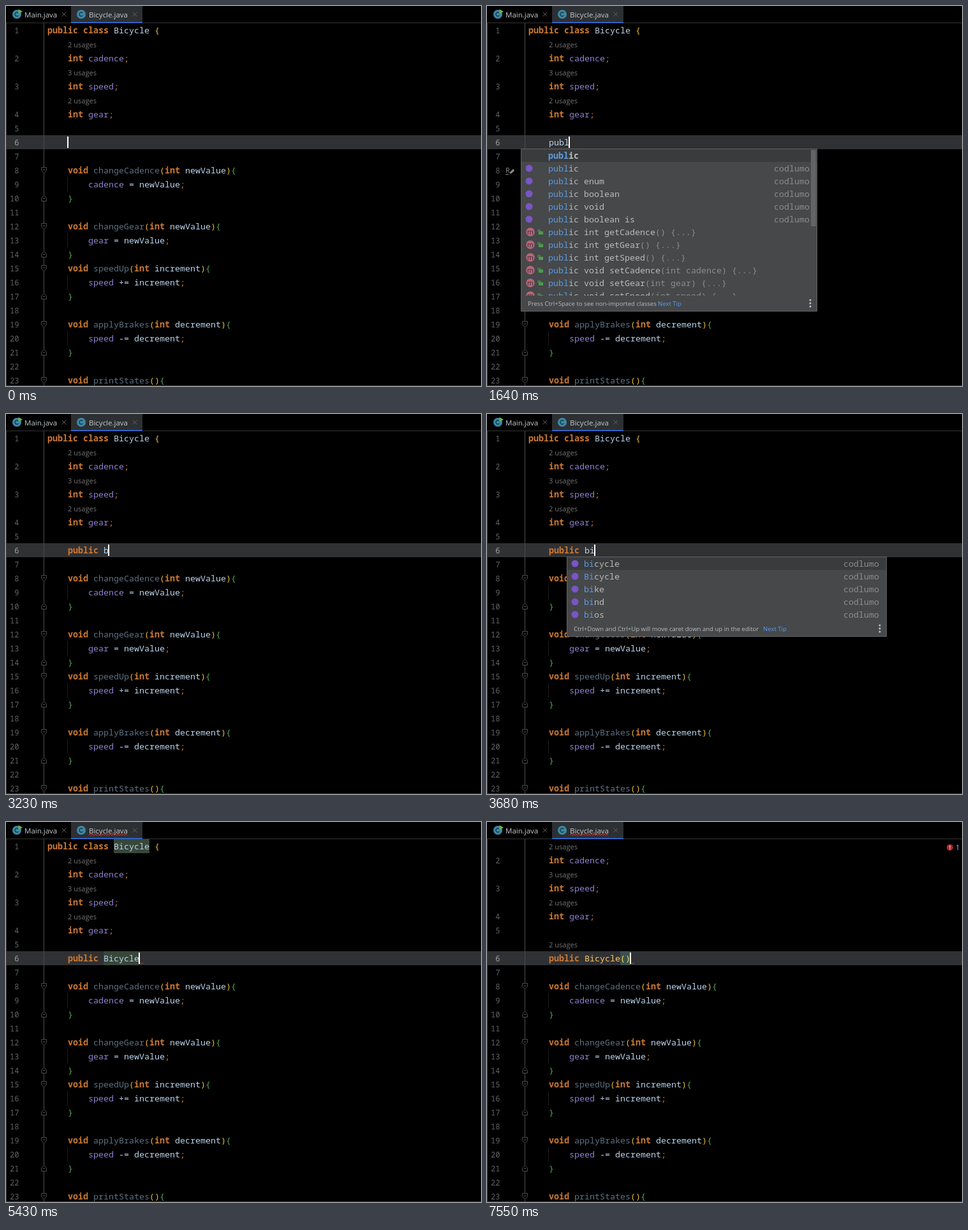
An HTML page that plays this animation: 745x597 px, repeating every 8 s.

```html
<!DOCTYPE html>
<html lang="en">
<head>
<meta charset="utf-8">
<title>Code completion</title>
<style>
  html, body { margin: 0; width: 100%; height: 100%; overflow: hidden; background: #000; }
  svg { display: block; width: 100%; height: 100%; }
  text { white-space: pre; }
  .mono { font: 13.333px "Noto Sans Mono", "DejaVu Sans Mono", monospace; }
  .num { font: 12px "Noto Sans Mono", "DejaVu Sans Mono", monospace; text-anchor: end; }
  .ui { font-family: "Open Sans", "Noto Sans", sans-serif; }
  .b { font-weight: 700; }
</style>
</head>
<body>
<svg id="stage" viewBox="0 0 745 597"></svg>
<script>
const LOOP = 8000, LINE = 22, ROW = 20, CH = 8, LEFT = 65;
const C = {
  text: '#bcd3ea', key: '#cc7832', field: '#9080d0', method: '#5f7180', made: '#ffc66d',
  gold: '#e8ba36', green: '#54a857', item: '#bbbbbb', dim: '#8c8c8c', match: '#5c9be0', red: '#cf3a36'
};
const stage = document.getElementById('stage');

const rect = (x, y, w, h, fill) => `<rect x="${x}" y="${y}" width="${w}" height="${h}" fill="${fill}"/>`;
const circle = (x, y, r, fill) => `<circle cx="${x}" cy="${y}" r="${r}" fill="${fill}"/>`;
const path = (d, stroke, fill = 'none', w = 1) =>
  `<path d="${d}" stroke="${stroke}" fill="${fill}" stroke-width="${w}"/>`;
const mono = (x, y, s, fill, bold) =>
  `<text class="mono${bold ? ' b' : ''}" x="${x}" y="${y}" fill="${fill}">${s}</text>`;
const ui = (x, y, s, fill, size) =>
  `<text class="ui" x="${x}" y="${y}" fill="${fill}" font-size="${size}">${s}</text>`;

// Last entry of [time, value] pairs that has begun at t
const at = (t, steps) => steps.reduce((v, s) => t >= s[0] ? s[1] : v, null);

function squiggle(x, end, y) {
  let d = `M${x} ${y + 2}`;
  for (let i = 1; x + i * 2 <= end; i++) d += `L${x + i * 2} ${y + (i % 2 ? 0 : 2)}`;
  return path(d, C.red);
}

// ---------- editor ----------

const SOURCE = [
  'public class Bicycle {', '    int cadence;', '    int speed;', '    int gear;', '', '', '',
  '    void changeCadence(int newValue){', '        cadence = newValue;', '    }', '',
  '    void changeGear(int newValue){', '        gear = newValue;', '    }',
  '    void speedUp(int increment){', '        speed += increment;', '    }', '',
  '    void applyBrakes(int decrement){', '        speed -= decrement;', '    }', '',
  '    void printStates(){'
];
const USAGES = { 2: 2, 3: 3, 4: 2 };

function tokenColor(tok, before) {
  if (/^(public|class|int|void)$/.test(tok)) return C.key;
  if (/^(cadence|speed|gear)$/.test(tok)) return C.field;
  if (/void $/.test(before)) return C.method;
  if (tok === ';') return C.key;
  if (/[()]/.test(tok) || /class/.test(before) && tok === '{') return C.gold;
  return /[{}]/.test(tok) ? C.green : C.text;
}

function codeLine(s, y) {
  let out = '';
  for (const m of s.matchAll(/\w+|[+\-]?=|\S/g)) {
    const fill = tokenColor(m[0], s.slice(0, m.index));
    out += mono(LEFT + m.index * CH, y, m[0], fill, fill === C.key && m[0] !== ';');
  }
  return out;
}

function fold(top, open) {
  const y = top + LINE / 2 + (open ? 0 : -1), k = open ? 1 : -1;
  return path(`M55.5 ${y + .5 - 5 * k}h8v${5 * k}l-4 ${4 * k}l-4 ${-4 * k}zM57.5 ${y + .5 - k}h4`, '#4a4a4a', '#000');
}

function lineTop(n, scrolled) {
  if (n >= 6) return 203 + (n - 6) * LINE;
  const inlays = Object.keys(USAGES).filter(k => k <= n).length;
  return 27 + (n - 1 + inlays) * LINE - (scrolled ? LINE : 0);
}

function editor(t) {
  const scrolled = t >= 7280, marked = t >= 5060 && t < 6970;
  let out = rect(1, 203, 744, 22, '#303133') + rect(59, 27, 1, 570, '#4c4c4c');
  if (marked) out += rect(169, 27, 56, LINE, '#37473a') + rect(153, 203, 56, LINE, '#37473a');
  if (scrolled) out += rect(209, 203, 16, LINE, '#3b514d') + ui(97, 197, '2 usages', '#787474', 11.07);
  SOURCE.forEach((s, i) => {
    const n = i + 1, top = lineTop(n, scrolled);
    if (USAGES[n]) out += ui(97, top - 6, USAGES[n] + ' usages', '#787474', 11.07);
    if (top < 27) return;
    out += `<text class="num" x="20.5" y="${top + 16}" fill="${n === 6 ? '#a4a3a3' : '#606366'}">${n}</text>`;
    out += codeLine(s, top + 16);
    if (n > 6 && s.endsWith('{')) out += fold(top, true);
    if (s.endsWith('}')) out += fold(top, false);
    if (n > 6 && s.startsWith('        ')) out += rect(96, top, 1, LINE, '#1e1e1e');
  });
  return out;
}

const TYPED = [
  [0, ''], [830, 'p'], [1170, 'pu'], [1330, 'pub'], [1500, 'publ'], [1660, 'publi'], [1830, 'public'],
  [2220, 'public '], [3230, 'public b'], [3470, 'public bi'], [4990, 'public Bicycle'], [6970, 'public Bicycle()']
];

function typedLine(t) {
  const s = at(t, TYPED), x = 97, y = 219;
  const keyword = t >= 1950;
  let out = mono(x, y, s.slice(0, 6), keyword ? C.key : C.text, keyword);
  out += mono(x + 56, y, s.slice(7, 14), t >= 7280 ? C.made : C.text);
  out += mono(x + 112, y, s.slice(14), t >= 7280 ? '#ffdc50' : C.gold);
  if (t >= 5330) {
    const end = x + s.length * CH;
    out += squiggle(end, end + 7, 221);
  }
  const hidden = [290, 4290, 6270].some((from, i) => t >= from && t < [830, 4790, 6770][i]);
  const col = s.length - (t >= 6970 && t < 7550 ? 1 : 0);
  return out + (hidden ? '' : rect(96 + col * CH, 205, 2, 18, '#ffffff'));
}

function renameMark() {
  return ui(29, 262, 'R', '#8a8a8a', 11) +
    path('M35.5 264l1-3.5 4.5-4.5 2.2 2.2-4.5 4.5z', 'none', '#8a8a8a') +
    path('M29 264.5h5', '#8a8a8a');
}

// ---------- tabs ----------

function tab(x, name, textX, closeX) {
  const r = 3.5;
  return circle(x, 13, 7, '#3c88a8') +
    path(`M${x + 2.4} 11.2a3 3 0 1 0 0 3.6`, '#173541', 'none', 1.3) +
    ui(textX, 18, name, '#c3c8cc', 11.5) +
    path(`M${closeX - r} ${13 - r}l7 7m0-7l-7 7`, '#5a5a5a');
}

function tabs(t) {
  let out = rect(0, 0, 745, 27, '#000') + rect(0, 26, 745, 1, '#323232') +
    rect(102, 0, 112, 25, '#2d3033') + rect(102, 25, 112, 2, '#2f62c8');
  out += tab(17, 'Main.java', 29, 91) + path('M19.5 5l6.5 3.8-6.5 3.8z', 'none', '#5fb84e');
  out += tab(118, 'Bicycle.java', 130, 202);
  if (t >= 5330) out += squiggle(130, 191, 19);
  return out;
}

function errorBadge() {
  return circle(726, 40, 5, '#b02a2a') + rect(725.3, 37, 1.4, 3.6, '#f0d0d0') +
    rect(725.3, 41.6, 1.4, 1.4, '#f0d0d0') + ui(735, 44, '1', '#b5b5b5', 11.5);
}

// ---------- completion popup ----------
// Row marks: * keyword, ~ assistant, @ method with its dim tail after |

const GETTERS = ['@public int getCadence|() {...}', '@public int getGear|() {...}', '@public int getSpeed|() {...}'];
const SETTERS = ['Cadence', 'Gear', 'Speed'].map(n => `@public void set${n}|(int ${n.toLowerCase()}) {...}`);
const FIRST = ['*public', '~public', '*private', '~public enum', '*protected', '~public boolean',
  '~public void', '~public boolean is', ...GETTERS, SETTERS[0]];
const NARROWED = [...FIRST.filter(s => !/pr[io]/.test(s)), SETTERS[1], SETTERS[2]];
const FULL = ['*public', '~public boolean', GETTERS[0], GETTERS[1], '~public enum',
  '~public void setSpeed(int speed) {', '~public void setSpeed(int speed)', '~public boolean is',
  GETTERS[2], ...SETTERS];
const B_ROWS = ['*boolean', '*byte', '~bicycle', '~Bicycle', '~boolean', '~bool', '~boolean is', '~byte', '~bike'];
const BI_ROWS = ['~bicycle', '~Bicycle', '~bike', '~bind', '~bios'];

const MOVE_TIP = 'Ctrl+Down and Ctrl+Up will move caret down and up in the editor';
const SPACE_TIP = 'Press Ctrl+Space to see non-imported classes';

function methodIcon(x, y) {
  return circle(x + 15, y, 6.7, '#b8667a') +
    `<text class="ui" x="${x + 15}" y="${y + 3.5}" font-size="10.5" fill="#33262a" text-anchor="middle">m</text>` +
    rect(x + 28, y - 1, 7, 5, '#4f9a50') + path(`M${x + 27} ${y}v-3h3.5v3`, '#4f9a50', 'none', 1.2);
}

function row(s, i, x, right, hit) {
  const kind = s[0], [head, tail = ''] = s.slice(1).split('|');
  const mid = 235 + i * ROW, y = mid + 5, tx = x + 43 - (x > 100 ? 16 : 0), bold = kind === '*';
  let out = mono(tx, y, head.slice(0, hit), C.match, bold) +
    mono(tx + hit * CH, y, head.slice(hit), C.item, bold) +
    mono(tx + head.length * CH, y, tail, C.dim);
  if (kind === '~') out += circle(x + 13, mid, 5.5, '#7a55c4') + mono(right - 68, y, 'codlumo', C.dim);
  if (kind === '@') out += methodIcon(x, mid);
  return out;
}

function popup({ x, right, rows, hit, tip, sel = 0, thumb = 0, listH = rows.length * ROW }) {
  const tipY = 225 + listH, h = listH + 26, mid = tipY + 12;
  const linkX = x + (tip === MOVE_TIP ? 308 : 215);
  let out = rect(x, 224, right - x, h, '#616365') + rect(x + 1, 225, right - x - 2, h - 2, '#46484a');
  out += `<clipPath id="list">${rect(x, 225, right - x, listH, '#000')}</clipPath><g clip-path="url(#list)">`;
  out += rect(x + 1, 225 + sel * ROW, right - x - 2, ROW, '#393b3d');
  rows.forEach((s, i) => out += row(s, i, x, right, hit));
  out += '</g>';
  if (thumb) out += rect(right - 10, 226, 8, thumb, '#626466');
  out += ui(x + 11, mid + 4, tip, '#bbbbbb', 9.57) + ui(linkX, mid + 4, 'Next Tip', '#589df6', 9.57);
  for (const dy of [-5, 0, 5]) out += circle(right - 11, mid + dy, 1.5, '#c4c6c8');
  return out;
}

function completion(t) {
  if (t >= 900 && t < 2220 && !(t >= 1990 && t < 2090)) return popup({
    x: 53, right: 518, listH: 230,
    rows: at(t, [[900, FIRST], [1250, NARROWED], [1700, FULL]]),
    hit: at(t, TYPED).length,
    tip: t < 1330 ? MOVE_TIP : SPACE_TIP,
    thumb: at(t, [[900, 95], [1250, 120], [1700, 145]])
  });
  if (t >= 3270 && t < 4990) return popup({
    x: 125, right: 627, rows: t < 3570 ? B_ROWS : BI_ROWS,
    hit: t < 3570 ? 1 : 2, tip: MOVE_TIP, sel: t >= 4590 ? 1 : 0
  });
  return '';
}

// ---------- loop ----------

let shown = '';
function draw(t) {
  let out = rect(0, 0, 745, 597, '#000') + editor(t) + typedLine(t);
  if (t >= 1500 && t < 3230) out += renameMark();
  if (t >= 5770) out += errorBadge();
  out += rect(0, 27, 1, 570, '#3c3c3c') + rect(0, 596, 745, 1, '#3c3c3c') + tabs(t) + completion(t);
  if (out !== shown) stage.innerHTML = shown = out;
}

function tick() {
  draw(performance.now() % LOOP);
  requestAnimationFrame(tick);
}
tick();
</script>
</body>
</html>
```
